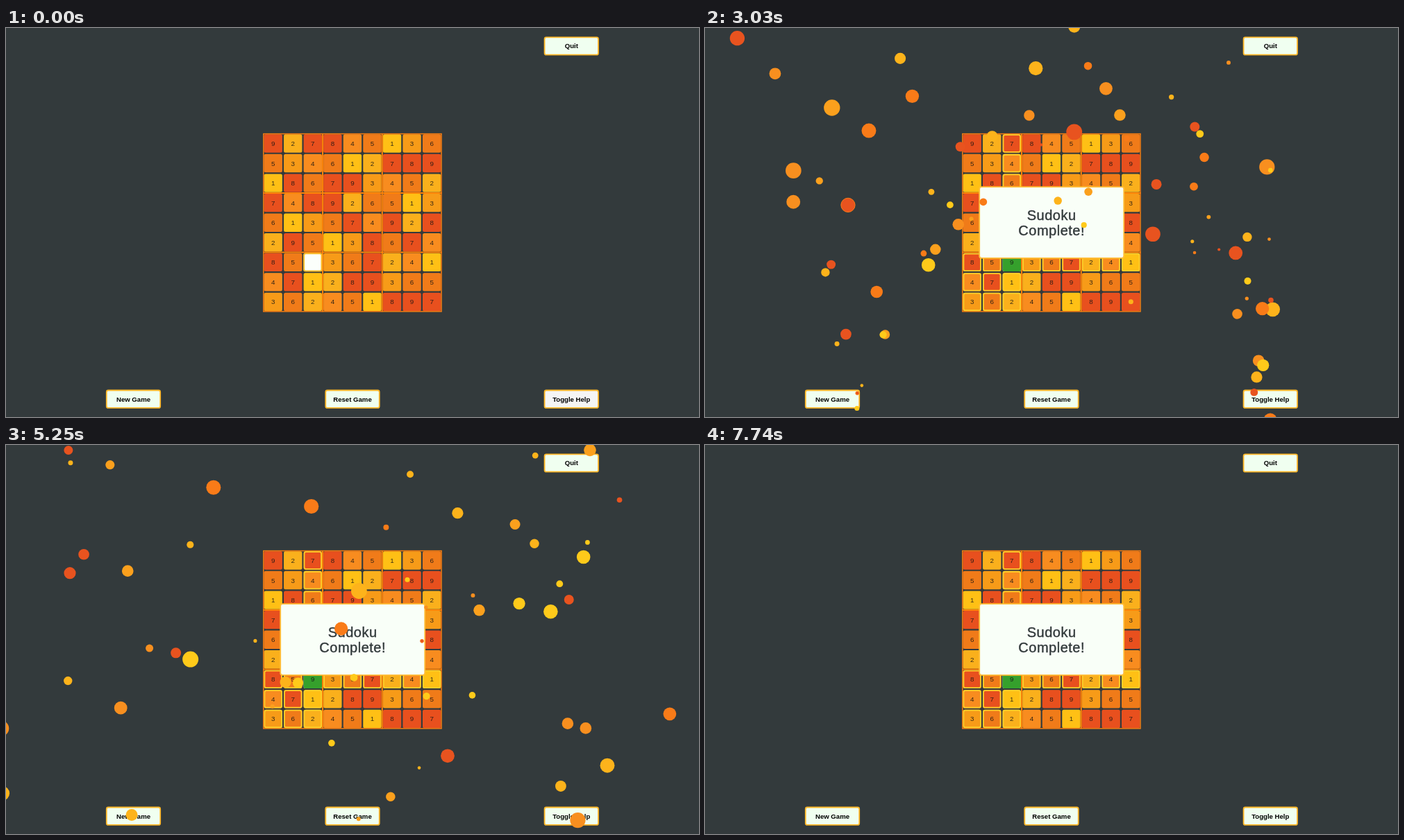
An HTML page for the animation above (7.86 s loop, 998 by 561 pixels).

```html
<!DOCTYPE html>
<html lang="en">
<head>
<meta charset="utf-8">
<title>Sudoku</title>
<style>
  html, body { margin: 0; width: 100%; height: 100%; overflow: hidden; background: #333a3c; }
  svg { display: block; width: 998px; height: 561px; }
  text { font-family: "Liberation Sans", Arial, sans-serif; text-anchor: middle; }
  .digit { font-size: 9.8px; fill: #141414; fill-opacity: .85; }
  .label { font-size: 9.6px; font-weight: bold; fill: #000; }
  .title { font-size: 20px; letter-spacing: .5px; fill: #333a3c; stroke: #333a3c; stroke-width: .4px; }
</style>
</head>
<body>
<svg id="stage" viewBox="0 0 998 561"></svg>
<script>
const LOOP = 7860, STEP = 30;
const stage = document.getElementById('stage');

function add(parent, tag, attrs, text) {
  const el = document.createElementNS(stage.namespaceURI, tag);
  for (const key in attrs) el.setAttribute(key, attrs[key]);
  if (text !== undefined) el.textContent = text;
  parent.appendChild(el);
  return el;
}

function centredRect(parent, cx, cy, w, h, attrs) {
  return add(parent, 'rect', { x: cx - w / 2, y: cy - h / 2, width: w, height: h, rx: 2.5, ...attrs });
}

// Board
const ROWS = ['927845136', '534612789', '186793452', '748926513', '613574928',
              '295138674', '85 367241', '471289365', '362451897'];
const DIGIT_COLORS = ['#fbfffb', '#ffc015', '#fab01c', '#f79b18', '#f88c1f',
                      '#f07b19', '#f07b19', '#e8501e', '#e8501e', '#e8501e'];
const LEFT = 370.4, TOP = 152.2, PITCH = 28.56, SIZE = PITCH * 9;
const PICK_ROW = 6, PICK_COL = 2;
const centre = (origin, i) => origin + (i + .5) * PITCH;
const sameBand = (a, b) => Math.floor(a / 3) === Math.floor(b / 3);

const board = add(stage, 'g', {});
const highlights = add(stage, 'g', { fill: 'none', stroke: '#ffd02a', 'stroke-width': 1.8 });

ROWS.forEach((row, r) => [...row].forEach((digit, c) => {
  const x = centre(LEFT, c), y = centre(TOP, r);
  centredRect(board, x, y, 26.4, 26.4, { fill: DIGIT_COLORS[+digit] });
  add(board, 'text', { class: 'digit', x, y: y + 3.5 }, digit);
  const related = r === PICK_ROW || c === PICK_COL || (sameBand(r, PICK_ROW) && sameBand(c, PICK_COL));
  if (related && digit !== ' ') centredRect(highlights, x, y, 24.6, 24.6, {});
}));

const lines = add(board, 'g', { stroke: '#ff8408', 'stroke-width': 2, fill: 'none' });
for (const n of [3, 6]) {
  add(lines, 'path', { d: `M${LEFT + n * PITCH} ${TOP}v${SIZE}M${LEFT} ${TOP + n * PITCH}h${SIZE}` });
}
centredRect(lines, LEFT + SIZE / 2, TOP + SIZE / 2, SIZE - .8, SIZE - .8, { rx: 0, 'stroke-width': 1.5, stroke: '#f57d12' });

const pickX = centre(LEFT, PICK_COL), pickY = centre(TOP, PICK_ROW);
const blank = centredRect(board, pickX, pickY, 25.4, 25.4, { fill: '#fbfffb', stroke: '#ffc02a', 'stroke-width': 2 });

const answer = add(stage, 'g', {});
centredRect(answer, pickX, pickY, 26.4, 26.4, { fill: '#35a02c' });
add(answer, 'text', { class: 'digit', x: pickX, y: pickY + 3.5 }, '9');

// Buttons and message
function button(x, y, label) {
  const face = centredRect(stage, x, y, 77.4, 25.4, { fill: '#f0fff0', stroke: '#ffb92a', 'stroke-width': 1.8 });
  add(stage, 'text', { class: 'label', x, y: y + 3.4 }, label);
  return face;
}
button(814.3, 26, 'Quit');
button(183.5, 535.2, 'New Game');
button(499, 535.2, 'Reset Game');
const helpFace = button(814.3, 535.2, 'Toggle Help');

const message = add(stage, 'g', {});
centredRect(message, 499.2, 280.5, 208, 102.6, { fill: '#f9fff8', stroke: '#ffbe3a', 'stroke-width': 1.8, rx: 3 });
['Sudoku', 'Complete!'].forEach((word, i) =>
  add(message, 'text', { class: 'title', x: 499.2, y: 276.6 + 22.6 * i }, word));

// Confetti: two fountains below the stage, times in seconds
const COLORS = ['#e8531f', '#f97b18', '#f88f1f', '#fba01d', '#fdb31b', '#ffca1a'];
const COUNT = 92, FIRST = 1.05, LAST = 3.5;
const GRAVITY = 300, FLOOR = 580;

let seed = 90210;
function random() {
  seed = (seed * 16807) % 2147483647;
  return seed / 2147483647;
}
const between = (min, max) => min + (max - min) * random();

const confetti = add(stage, 'g', {});
const particles = Array.from({ length: COUNT }, (_, i) => {
  const side = i % 2 ? 1 : -1;
  const color = Math.floor(between(0, COLORS.length));
  const spread = (i * .618034 + .1 * random()) % 1;   // evenly scattered launch speeds
  const el = add(confetti, 'circle', { r: between(2, 11.8), fill: COLORS[color] });
  if (color === 0 && random() < .25) el.setAttribute('stroke', COLORS[1]);
  return {
    el,
    born: FIRST + (LAST - FIRST) * i / COUNT,
    x: 499 + side * between(284, 314),
    vx: -side * between(-80, 235),
    vy: 390 + 243 * spread
  };
});

function draw(ms) {
  const fade = Math.min(1, Math.max(0, (ms - 120) / 180));
  const answered = ms >= 780;
  highlights.setAttribute('opacity', fade);
  helpFace.setAttribute('fill', `rgb(${245 - 5 * fade},${245 + 10 * fade},${245 - 5 * fade})`);
  blank.setAttribute('visibility', answered ? 'hidden' : 'visible');
  answer.setAttribute('visibility', answered ? 'visible' : 'hidden');
  message.setAttribute('visibility', ms >= 810 ? 'visible' : 'hidden');
  for (const p of particles) {
    const age = ms / 1000 - p.born;
    const y = FLOOR - p.vy * age + GRAVITY / 2 * age * age;
    const alive = age > 0 && y < FLOOR;
    p.el.setAttribute('visibility', alive ? 'visible' : 'hidden');
    p.el.setAttribute('cx', p.x + p.vx * age);
    p.el.setAttribute('cy', y);
  }
}

const start = performance.now();
function tick() {
  const ms = (performance.now() - start) % LOOP;
  draw(Math.floor(ms / STEP) * STEP);
  requestAnimationFrame(tick);
}
draw(0);
requestAnimationFrame(tick);
</script>
</body>
</html>
```
